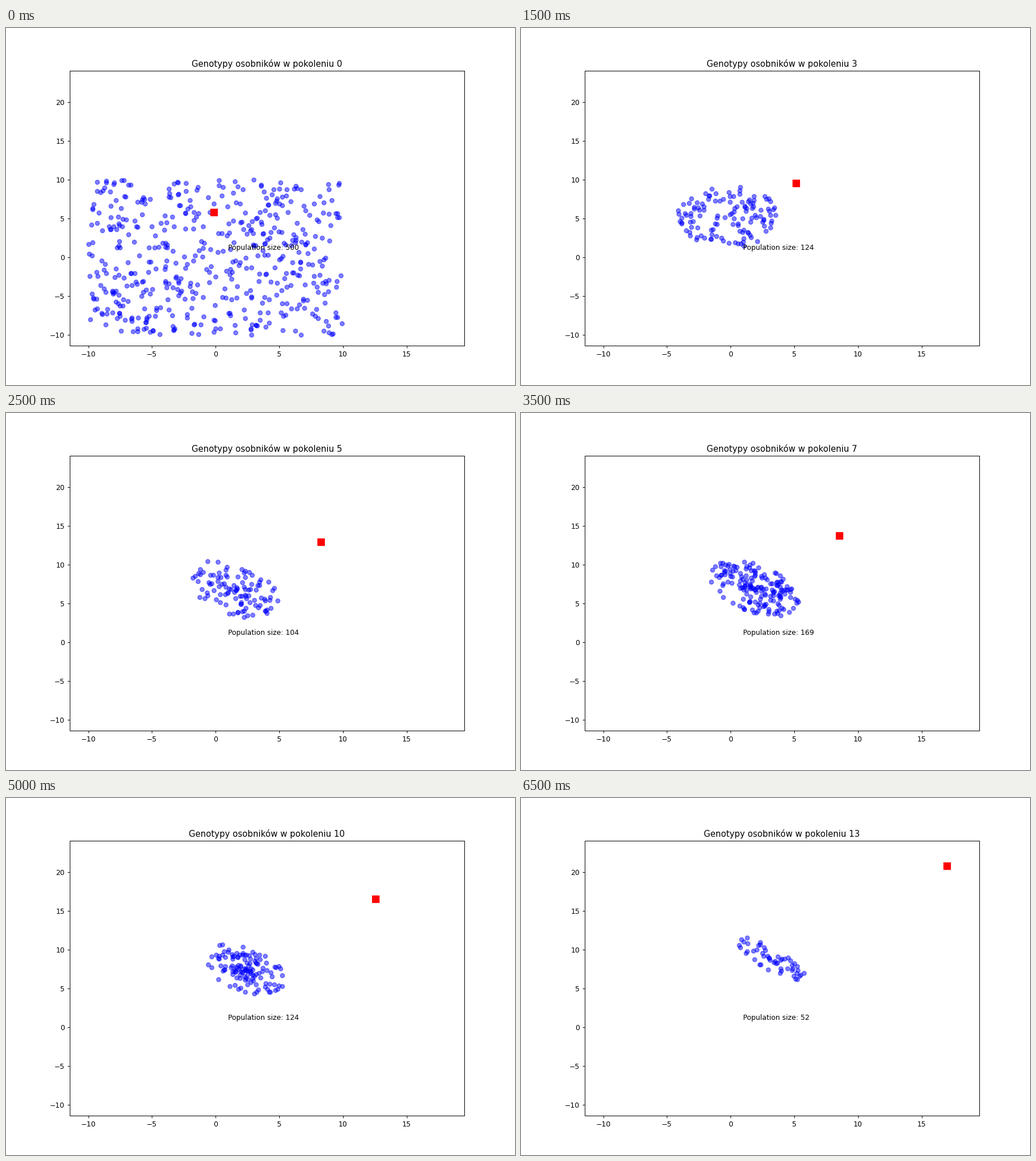
A matplotlib script that plays this animation: 894 by 626 pixels, repeating every 7000 ms.

```python
import numpy as np
import matplotlib.pyplot as plt
from matplotlib.animation import FuncAnimation

W, H, DPI = 894, 626, 89.4
EPS = 1e-6  # keeps the canvas from being truncated by a pixel
GENERATIONS = 14
STEP_MS = 500


def goal_at(gen):
    """Optimum drifting to the upper right in uneven steps."""
    keys = [0, 1, 3, 5, 7, 10, 12, 13]
    x = np.interp(gen, keys, [-0.14, 2.95, 5.14, 8.25, 8.54, 12.57, 13.8, 16.97])
    y = np.interp(gen, keys, [5.83, 7.12, 9.58, 13.0, 13.77, 16.6, 18.7, 20.87])
    return x, y


def size_at(gen):
    return int(np.interp(gen, [0, 1, 3, 5, 7, 10, 13],
                         [500, 72, 124, 104, 169, 124, 52]))


def population(gen):
    """A uniform square at first, then a disc that shrinks, tilts and condenses."""
    rng = np.random.default_rng(40 + gen)
    size = size_at(gen)
    if gen == 0:
        return rng.uniform(-10, 10, (size, 2))

    keys = [1, 3, 5, 10, 13]
    cx = np.interp(gen, keys, [-0.2, -0.2, 1.6, 2.3, 3.1])
    cy = np.interp(gen, keys, [6.2, 5.3, 6.7, 7.4, 8.8])
    tilt = np.interp(gen, [3, 5, 10, 13], [0, 0.45, 0.45, 0.85])
    power = np.interp(gen, [3, 5], [0.5, 0.75])
    spread = 4.3 - 0.1 * gen

    r = spread * rng.random(size) ** power
    a = rng.uniform(0, 2 * np.pi, size)
    u, v = r * np.cos(a), r * np.sin(a)
    return np.column_stack([cx + u, cy - tilt * u + np.sqrt(1 - tilt ** 2) * v])


clouds = [population(g) for g in range(GENERATIONS)]

plt.rcParams["font.family"] = "DejaVu Sans"
fig, ax = plt.subplots(figsize=((W + EPS) / DPI, (H + EPS) / DPI), dpi=DPI)
ax.set_xlim(-11.465, 19.52)
ax.set_ylim(-11.385, 24.06)
dots = ax.scatter([], [], color="blue", alpha=0.5)
goal = ax.scatter([], [], color="red", marker="s", s=100)
label = ax.text(1, 1, "")
title = ax.set_title("")


def update(gen):
    dots.set_offsets(clouds[gen])
    goal.set_offsets([goal_at(gen)])
    label.set_text(f"Population size: {size_at(gen)}")
    title.set_text(f"Genotypy osobników w pokoleniu {gen}")
    return dots, goal, label, title


anim = FuncAnimation(fig, update, frames=GENERATIONS, interval=STEP_MS,
                     repeat=True, repeat_delay=0, blit=False)
plt.show()
```
